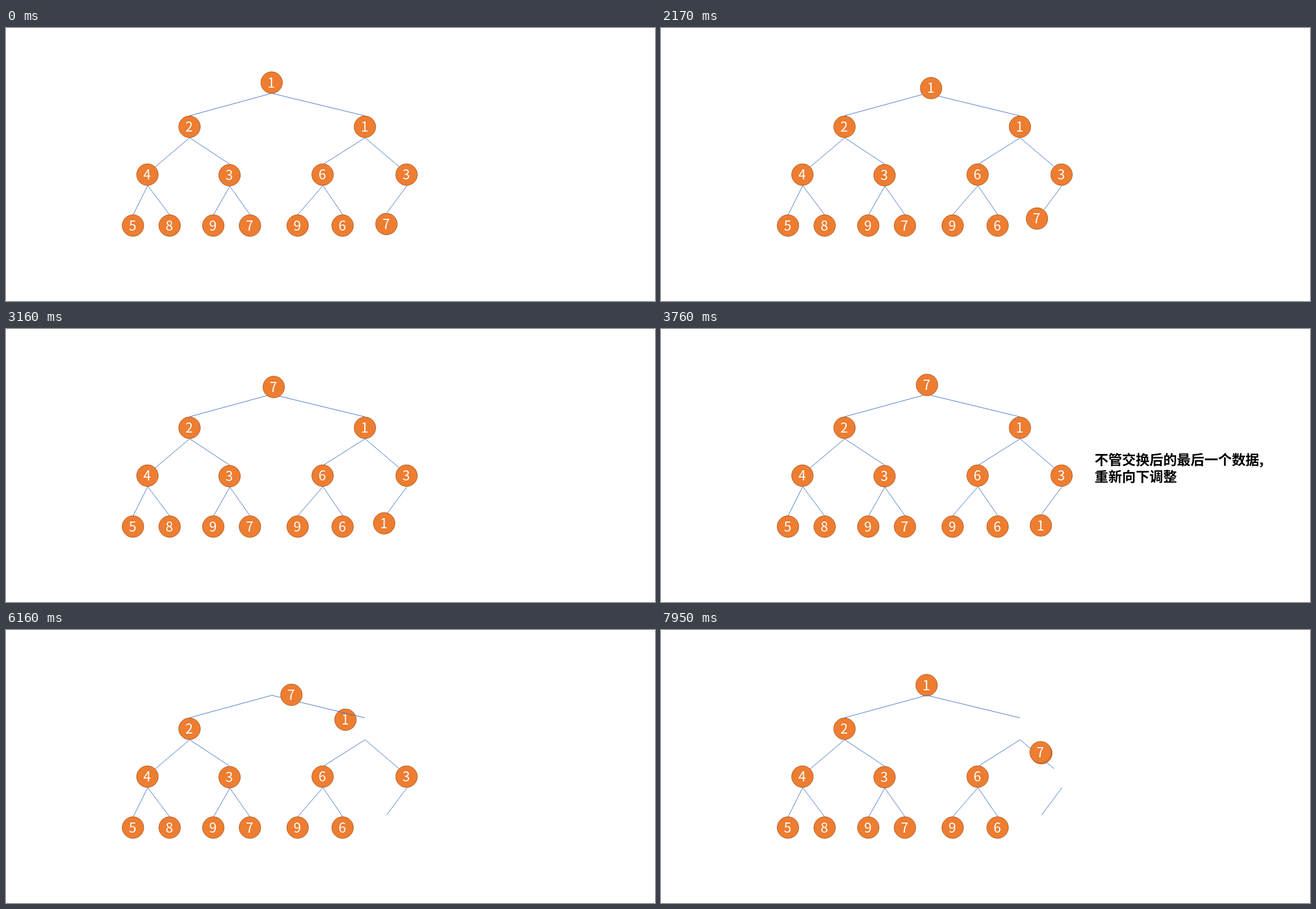
These frames come from a looping animation (1154x485 px, 8 s). An HTML page:

```html
<!DOCTYPE html>
<html lang="zh-CN">
<head>
<meta charset="utf-8">
<title>堆排序</title>
<style>
  html, body { margin: 0; width: 100%; height: 100%; overflow: hidden; background: #fff; }
  svg { display: block; width: 1154px; height: 485px; }
  text { font-family: "Noto Sans CJK SC", "Noto Sans CJK", "Noto Sans", sans-serif; }
  .node circle { fill: #ed7d31; stroke: #ae5a21; stroke-width: 1; }
  .node text { font-size: 24px; font-weight: 300; fill: #fff; text-anchor: middle; }
  #edges { fill: none; stroke: #4472c4; stroke-width: 1; }
  .note { font-size: 24.4px; font-weight: 700; fill: #000; opacity: 0; }

  #swapNote, #siftNote, #root, #right, #child, #last {
    animation: 8s linear infinite;
  }
  #swapNote { animation-name: swapNote; }
  #siftNote { animation-name: siftNote; }
  #root { animation-name: root; }
  #right { animation-name: right; }
  #child { animation-name: child; }
  #last { animation-name: last; }

  @keyframes swapNote {
    0%, .3% { opacity: 0; }
    5.2%, 18.1% { opacity: 1; }
    24.2%, 100% { opacity: 0; }
  }
  @keyframes siftNote {
    0%, 41.1% { opacity: 0; }
    47%, 60.7% { opacity: 1; }
    66.5%, 100% { opacity: 0; }
  }

  /* Each swap accelerates to its midpoint, then decelerates. */
  @keyframes root {
    0% { transform: translate(0, 0); opacity: 1; }
    24.9% { transform: translate(0, 0); animation-timing-function: cubic-bezier(.333, 0, .667, .333); }
    32.9% { transform: translate(101.6px, 126px); animation-timing-function: cubic-bezier(.333, .667, .667, 1); }
    40.9% { transform: translate(203.2px, 252px); }
    66.5% { opacity: 1; }
    71.8% { opacity: 0; }
    100% { transform: translate(203.2px, 252px); opacity: 0; }
  }
  @keyframes right {
    0% { transform: translate(0, 0); }
    71.85% { transform: translate(0, 0); animation-timing-function: cubic-bezier(.333, 0, .667, .333); }
    79.85% { transform: translate(-83px, -38.75px); animation-timing-function: cubic-bezier(.333, .667, .667, 1); }
    87.85%, 100% { transform: translate(-166px, -77.5px); }
  }
  @keyframes child {
    0% { transform: translate(0, 0); }
    91.45% { transform: translate(0, 0); animation-timing-function: cubic-bezier(.333, 0, .667, .333); }
    99.45% { transform: translate(-36.5px, -42.25px); }
    100% { transform: translate(-41.3px, -47.8px); }
  }
  @keyframes last {
    0% { transform: translate(0, 0); }
    24.9% { transform: translate(0, 0); animation-timing-function: cubic-bezier(.333, 0, .667, .333); }
    32.9% { transform: translate(-101.75px, -124.5px); animation-timing-function: cubic-bezier(.333, .667, .667, 1); }
    40.9% { transform: translate(-203.5px, -249px); }
    71.85% { transform: translate(-203.5px, -249px); animation-timing-function: cubic-bezier(.333, 0, .667, .333); }
    79.85% { transform: translate(-120.5px, -211px); animation-timing-function: cubic-bezier(.333, .667, .667, 1); }
    87.85% { transform: translate(-37.5px, -173px); }
    91.45% { transform: translate(-37.5px, -173px); animation-timing-function: cubic-bezier(.333, 0, .667, .333); }
    99.45% { transform: translate(-1px, -130.5px); }
    100% { transform: translate(3.8px, -124.9px); }
  }
</style>
</head>
<body>
<svg viewBox="0 0 1154 485">
  <g id="under"></g>
  <path id="edges" d="M326 156 472.5 116 638 156
    M265 247 326.5 195 398 242
    M565 241.5 638.5 195 699 246.5
    M226 332 252 280 291 332
    M369 332 398 281 434 332
    M518.5 332 563.5 280 599 332
    M713 280 677 328.5"/>
  <g id="over"></g>
  <text id="swapNote" class="note"><tspan x="752" y="106">最值与最后</tspan><tspan x="752" y="136">一个值交换.</tspan></text>
  <text id="siftNote" class="note"><tspan x="771" y="241">不管交换后的最后一个数据,</tspan><tspan x="771" y="271">重新向下调整</tspan></text>
</svg>
<script>
  const node = ([digit, x, y, id = '']) =>
    `<g transform="translate(${x} ${y})"><g class="node" ${id && `id="${id}"`}>` +
    `<circle r="19.2"/><text x="-.6" y="8.6">${digit}</text></g></g>`;

  const draw = (layer, nodes) => {
    document.getElementById(layer).innerHTML = nodes.map(node).join('');
  };

  draw('under', [[1, 638.2, 175.5, 'right']]);
  draw('over', [
    [1, 472.3, 97, 'root'],
    [2, 326.3, 175.5],
    [4, 251.5, 260.5], [3, 397.5, 261.5], [6, 563, 260.5], [3, 712.2, 260.5, 'child'],
    [5, 225.8, 351], [8, 291, 351], [9, 368.6, 351], [7, 433.8, 351],
    [9, 518.6, 351], [6, 598.5, 351], [7, 676.5, 348.3, 'last']
  ]);
</script>
</body>
</html>
```
